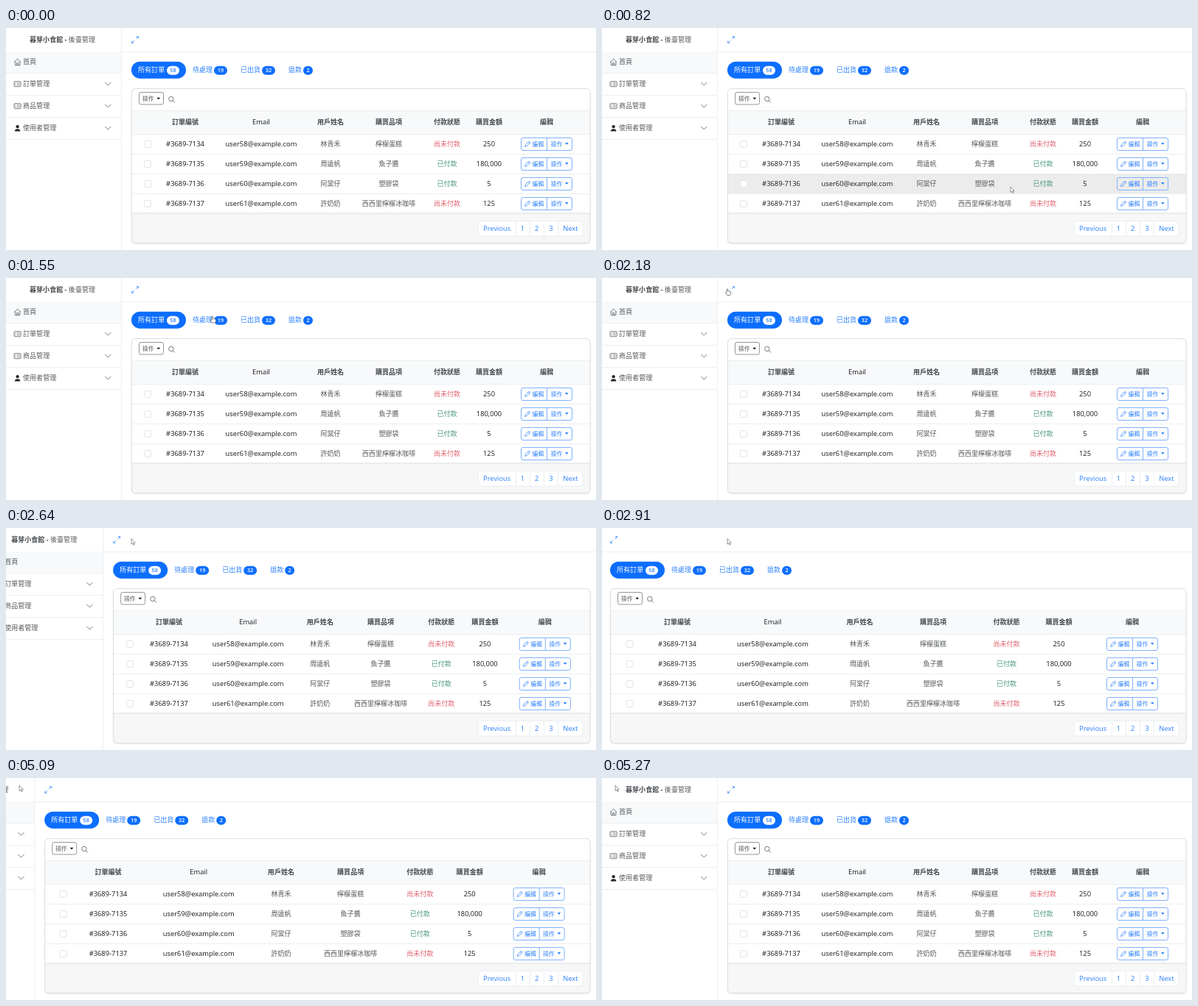
An HTML page for the animation above (6000 ms loop, 800 by 302 pixels).

```html
<!DOCTYPE html>
<html lang="zh-Hant">
<head>
<meta charset="utf-8">
<title>後臺管理</title>
<style>
html, body { margin: 0; width: 100%; height: 100%; overflow: hidden; background: #fff; }
svg { display: block; width: 800px; height: 302px; }
text { font: 9.05px "Open Sans", "Noto Sans CJK TC", "Noto Sans CJK JP", sans-serif; fill: #55595d; }
.latin { font-size: 9.36px; fill: #15191d; }
.bold { font-weight: 700; fill: #45494d; }
.small { font-size: 7.7px; }
.badge { font-size: 7.3px; font-weight: 600; }
.mid { text-anchor: middle; }
.blue { fill: #0d6efd; }
text.blue { fill: #2c80fd; }
.white { fill: #fff; }
.red { fill: #e0626d; }
.green { fill: #4a9878; }
.line { fill: none; stroke: #4a4e52; stroke-width: .75; }
.line.edge { stroke: #eceef0; stroke-width: 1; }
.line.rule { stroke: #dcdee0; stroke-width: 1; }
.line.accent { stroke: #2c80fd; }
.line.button { stroke: #7fb1fe; stroke-width: 1; }
.shade { fill: #f7f7f7; }
#frame { filter: drop-shadow(0 1px 1px rgba(0, 0, 0, .12)); }
</style>
</head>
<body>
<svg id="stage" viewBox="0 0 800 302"></svg>
<script>
const stage = document.getElementById('stage');
const LEFT = 170, SLIDE = 159, FRAMES = 66, LOOP = 6000;
const ROW_TOP = 144, ROW_H = 27;

const text = (x, y, s, cls = '') => `<text x="${x}" y="${y + 3.4}" class="${cls}">${s}</text>`;
const rect = (x, y, w, h, attrs = '') => `<rect x="${x}" y="${y}" width="${w}" height="${h}" ${attrs}/>`;
const path = (d, cls = 'line', attrs = '') => `<path d="${d}" class="${cls}" ${attrs}/>`;
const group = (id, body) => `<g id="${id}">${body}</g>`;
const at = (x, y, body) => `<g transform="translate(${x} ${y})">${body}</g>`;
const caret = (x, y, cls) => path(`M${x} ${y - 1.2}h4.6l-2.3 2.5z`, cls);

// Sidebar
const icons = {
  home: path('M.6 5.2L5 .9l4.4 4.3M1.7 4.4v5h6.6v-5M3.9 9.2V6.3h2.2v2.9'),
  list: rect(.5, 1.5, 9, 7, 'rx="1" class="line"') + path('M2 3.7h1.3M4.4 3.7h3.7M2 6.2h1.3M4.4 6.2h3.7'),
  person: '<circle cx="5" cy="3" r="2.1" fill="#212529"/>' +
    path('M1.2 9.2C1.2 4.9 8.8 4.9 8.8 9.2z', '', 'fill="#212529"')
};

function sidebar() {
  const items = [['home', '首頁'], ['list', '訂單管理'], ['list', '商品管理'], ['person', '使用者管理']];
  let s = rect(-4, 0, 160, 302, 'fill="#fff"') + rect(-4, 32, 160, 29.5, 'fill="#f8f9fa"') +
    path('M156.5 0V302', 'line edge') +
    text(32, 16, '<tspan class="bold">暮芽小食館 -</tspan> 後臺管理');
  items.forEach(([icon, label], i) => {
    const y = 46 + 30 * i;
    s += at(10.6, y - 4.8, icons[icon]) + text(23, y, label) +
      path(`M-4 ${y + 15.5}H156`, 'line edge');
    if (i) s += path(`M134.3 ${y - 2}l4 4 4-4`);
  });
  return s;
}

// Tabs and toolbar
function tabs() {
  const list = [['所有訂單', 58, 179, 218, 17], ['待處理', 19, 253, 282, 18],
    ['已出貨', 32, 318, 347, 18], ['退款', 2, 383, 403, 13]];
  return rect(LEFT, 45.7, 74, 23, 'rx="11.5" class="blue"') + list.map(([label, n, x, bx, w], i) =>
    text(x, 57, label, i ? 'blue' : 'white') +
    rect(bx, 51.7, w, 12, `rx="6" class="${i ? 'blue' : 'white'}"`) +
    text(bx + w / 2, 57, n, 'badge mid ' + (i ? 'white' : 'blue'))).join('');
}

const tools = () => rect(180.5, 87.5, 33, 16.5, 'rx="2.5" fill="#fff" stroke="#868b90" stroke-width=".9"') +
  text(185, 95.5, '操作', 'small') + caret(204.5, 96, '') +
  '<circle cx="223.8" cy="96.4" r="3.2" class="line"/>' + path('M226.2 98.8l2.7 2.7');

const expandIcon = () => at(170, 11, path('M3.9 6L.7 9.2M.6 6.7v2.7h2.7M6.1 3.9L9.3.7M6.7.6h2.7v2.7', 'line accent'));

// Table: centre, shift when the sidebar is hidden, heading, cells
const rowY = i => ROW_TOP + 13.5 + ROW_H * i;
const paid = [false, true, true, false];
const columns = [
  [243, -141, '訂單編號', [4, 5, 6, 7].map(n => '#3689-713' + n), 'latin'],
  [346, -114.5, 'Email', [58, 59, 60, 61].map(n => `user${n}@example.com`), 'latin'],
  [440, -90.5, '用戶姓名', ['林青禾', '周遠帆', '阿棠仔', '許奶奶']],
  [519, -70, '購買品項', ['檸檬蛋糕', '魚子醬', '塑膠袋', '西西里檸檬冰咖啡']],
  [598, -49.5, '付款狀態', paid.map(p => p ? '已付款' : '尚未付款'), i => paid[i] ? 'green' : 'red'],
  [655, -35.5, '購買金額', ['250', '180,000', '5', '125'], 'latin'],
  [733, -14, '編輯', []],
  [192, -154.5, '', []]
];

const editButtons = y => rect(698.5, y - 8, 69, 17, 'rx="2.5" class="line button"') +
  path(`M733.5 ${y - 8}v17`, 'line button') +
  at(703, y - 4, path('M.6 7.9l.7-2.5L6 .7l1.8 1.8-4.7 4.7zM4.8 1.9l1.8 1.8', 'line accent')) +
  text(713.7, y, '編輯', 'small blue') + text(738.7, y, '操作', 'small blue') + caret(758, y, 'blue');

function column([x, , head, cells, cls = ''], i) {
  const pick = typeof cls === 'function' ? cls : () => cls;
  let s = text(x, 128, head, head === 'Email' ? 'mid latin' : 'mid bold');
  cells.forEach((c, r) => s += text(x, rowY(r), c, 'mid ' + pick(r)));
  for (let r = 0; r < 4; r++) {
    if (i === 6) s += editButtons(rowY(r));
    if (i === 7) s += rect(x - 4.5, rowY(r) - 4, 9, 9, 'rx="2" fill="#fff" stroke="#dfe2e5"');
  }
  return group('col' + i, s);
}

function pager() {
  let s = rect(640.5, 262.5, 141.5, 20.5, 'rx="3.5" fill="#fff" stroke="#eceef0"');
  [691, 710, 729, 748].forEach(x => s += path(`M${x + .5} 262.5v20.5`, 'line edge'));
  [[665.7, 'Previous'], [700.5, 1], [719.6, 2], [738.8, 3], [765.4, 'Next']]
    .forEach(([x, label]) => s += text(x, 272.3, label, 'mid latin blue'));
  return s;
}

function table() {
  let s = rect(0, 112.5, 800, 32, 'fill="#f8f9fa"') + rect(0, 252, 800, 41, 'class="shade"') +
    rect(0, 0, 800, ROW_H, 'id="hover" fill="#ececec"');
  [112.5, 144.5, 171.5, 198.5, 225.5].forEach(y => s += path(`M0 ${y}H800`, 'line edge'));
  return s + path('M0 252H800', 'line rule');
}

const arrow = path('M0 0v7.6l1.8-1.6 1.2 2.7 1.1-.5-1.2-2.6h2.5z', '',
  'fill="#fff" stroke="#555" stroke-width=".6" stroke-linejoin="round"');
const hand = path('M-.8 5V.8Q0-.4.8.8V3.4Q1.7 2.8 2.3 3.7 3.3 3.2 3.6 4.2 4.6 4 4.6 5V6.6Q4.5 8 3.6 9H-.2Q-1.2 7.6-2.4 5.8-2.6 4.6-1.5 4.7z', '',
  'fill="#fff" stroke="#444" stroke-width=".65" stroke-linejoin="round"');

stage.innerHTML =
  '<defs><clipPath id="clip"><rect class="card" y="82.5" height="210" rx="5"/></clipPath></defs>' +
  path('M0 32.5H800', 'line edge') +
  group('bar', expandIcon() + tabs()) +
  '<rect id="frame" class="card" y="82.5" height="210" rx="5" fill="#fff"/>' +
  `<g clip-path="url(#clip)">${table()}</g>` +
  '<rect class="card" y="82.5" height="210" rx="5" fill="none" stroke="#dcdee0"/>' +
  group('tools', tools()) + columns.map(column).join('') + pager() +
  group('side', sidebar()) +
  group('cursor', group('arrow', arrow) + group('hand', hand));

const el = id => document.getElementById(id);
const shift = (id, x, y = 0) => el(id).setAttribute('transform', `translate(${x} ${y})`);
const show = (id, on) => el(id).setAttribute('visibility', on ? 'visible' : 'hidden');
const cards = stage.querySelectorAll('.card');

// Pointer path: step, x, y
const route = [[5, 592, 272], [6, 574, 238], [7, 559, 218], [8, 559, 218], [9, 554, 216], [12, 446, 144],
  [15, 338, 74], [19, 222, 30], [21, 184, 12], [22, 178, 14], [24, 170, 14.5], [40, 170, 14.5], [43, 85, 42],
  [45, 53, 55], [48, 68, 58], [49, 68, 58], [53, 18, 10], [FRAMES, 18, 10]];

function pointer(k) {
  const i = route.findIndex(p => p[0] > k);
  const [a, b] = [route[i - 1], route[i]];
  const u = (k - a[0]) / (b[0] - a[0]);
  return [a[1] + (b[1] - a[1]) * u, a[2] + (b[2] - a[2]) * u];
}

function smooth(u) {
  u = Math.min(1, Math.max(0, u));
  return u * u * (3 - 2 * u);
}

function draw(ms) {
  // The screen updates 11 times per second, on a 10 ms clock.
  const k = Math.floor((Math.floor(ms % LOOP / 10) + .5) * .11);
  const hidden = smooth((k - 28) / 4) - smooth((k - 55) / 3);
  const dx = -SLIDE * hidden, left = LEFT + dx;

  ['bar', 'tools', 'side'].forEach(id => shift(id, dx));
  columns.forEach((c, i) => shift('col' + i, c[1] * hidden));
  cards.forEach(c => {
    c.setAttribute('x', left + .5);
    c.setAttribute('width', 791.5 - left);
  });

  const active = k >= route[0][0];
  const [x, y] = active ? pointer(k) : [0, 0];
  const row = Math.floor((y - ROW_TOP + .5) / ROW_H);
  const onRow = active && row >= 0 && row < 4;
  const onTab = y > 46 && y < 69 && x > left && x < left + 248;
  const onIcon = y > 8 && y < 22 && x > left - 2 && x < left + 11;
  const link = onTab || onIcon;

  show('hover', onRow);
  if (onRow) shift('hover', 0, ROW_TOP + .5 + row * ROW_H);
  show('arrow', active && !link);
  show('hand', active && link);
  shift('cursor', x, y);
}

const start = performance.now();
function tick() {
  draw(performance.now() - start);
  requestAnimationFrame(tick);
}
tick();
</script>
</body>
</html>
```
